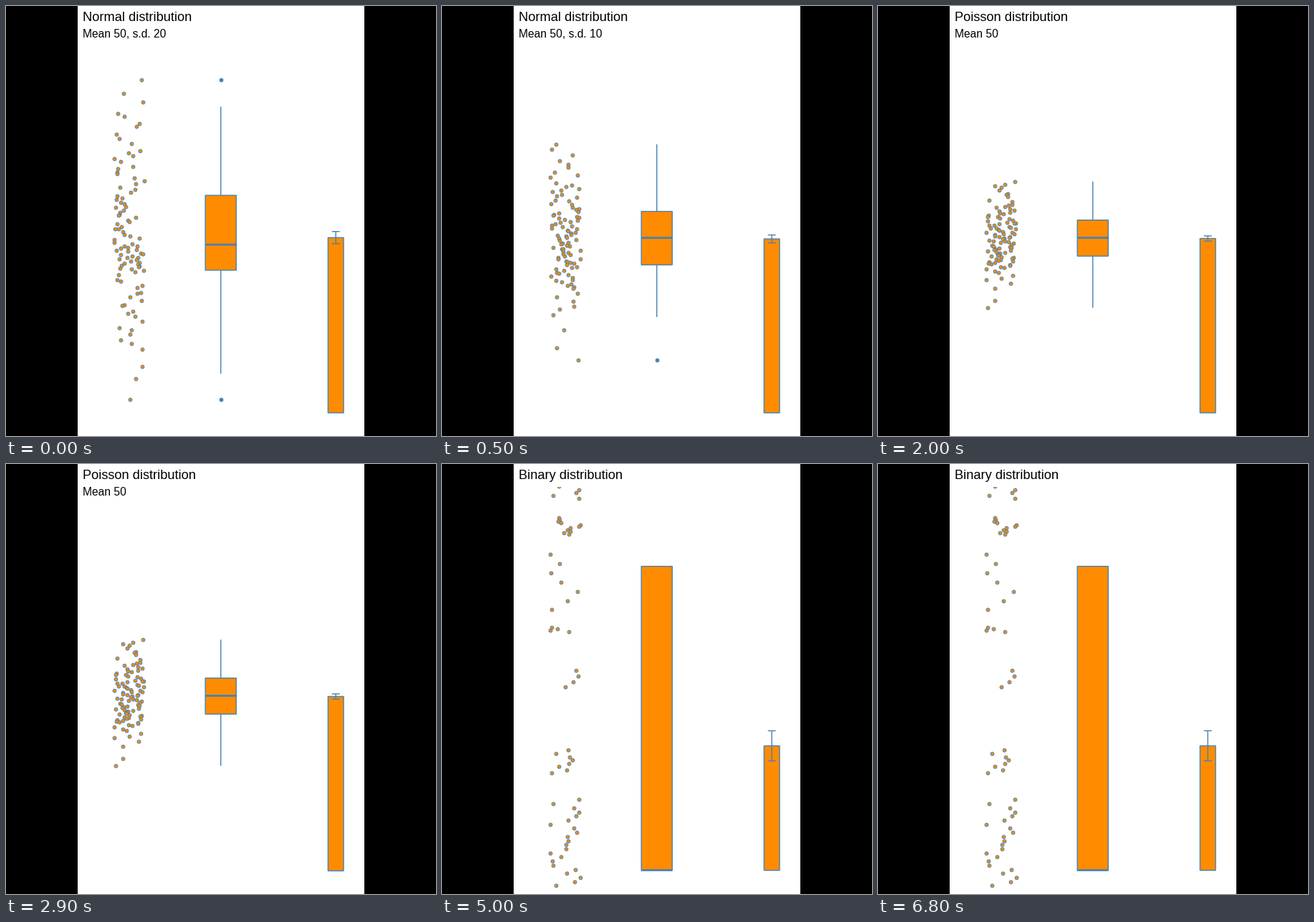
Write a matplotlib script that moves like this. It is 600 px wide and 600 px high and loops after 8000 ms.

```python
import numpy as np
import matplotlib.pyplot as plt
from matplotlib.animation import FuncAnimation
from matplotlib.patches import Rectangle

FILL, LINE = "darkorange", "steelblue"
PX = 0.72  # points per pixel at 100 dpi
STEP_MS = 500
RANKS = [0, 0.03, 0.1, 0.25, 0.5, 0.75, 0.9, 0.97, 1]
DOTS_X, BOX_X, BAR_X = 172, 299.7, 460.2
BASE = 567.7

rng = np.random.default_rng(50)
fig = plt.figure(figsize=(6, 6), dpi=100, facecolor="black")
ax = fig.add_axes([0, 0, 1, 1])
ax.set(xlim=(0, 600), ylim=(600, 0))
ax.axis("off")
ax.add_patch(Rectangle((100, 0), 400, 600, color="white", lw=0))


def stroke(xs, ys, width=1.4):
    return ax.plot(xs, ys, color=LINE, lw=width * PX, snap=False,
                   solid_capstyle="butt", zorder=3)[0]


def block(center, width, top, bottom):
    return ax.add_patch(Rectangle((center - width / 2, top), width, bottom - top,
                                  fc=FILL, ec=LINE, lw=1.4 * PX, snap=False,
                                  joinstyle="miter", zorder=2))


def label(y, text, size):
    return ax.text(106.8, y, text, family="Liberation Sans", size=size * PX,
                   color="black", va="baseline")


def dots(xs, ys, color):
    return ax.scatter(xs, ys, s=(4.9 * PX) ** 2, c=color, ec=LINE, lw=0.9 * PX,
                      snap=False, zorder=4)


def sample(quantiles, count=100):
    """Heights spread over the quantile curve, touching both extremes."""
    noise = rng.uniform(-0.4, 0.4, count) / count
    noise[[0, -1]] = 0
    return np.interp(np.linspace(0, 1, count) + noise, RANKS, quantiles)


def scene(title, subtitle, heights, box, whisker, bar, error,
          outliers=(), base=BASE, panel_top=54.5):
    xs = DOTS_X + rng.uniform(-21.5, 21.5, len(heights))
    points = dots(xs, heights + 0.4, FILL)
    points.set_clip_path(Rectangle((100, panel_top), 400, 600 - panel_top,
                                   transform=ax.transData))
    upper, median, lower = box
    ends = bar - error, bar + error
    return [
        label(21.4, title, 18.3),
        label(44.3, subtitle, 15.6),
        points,
        stroke([BOX_X] * 2, [max(whisker[0], panel_top), upper]),
        stroke([BOX_X] * 2, [lower, whisker[1]]),
        block(BOX_X, 43.1, upper, lower),
        stroke([BOX_X - 21.5, BOX_X + 21.5], [median] * 2, 2.8),
        dots([BOX_X] * len(outliers), outliers, LINE),
        block(BAR_X, 21.7, bar, base),
        stroke([BAR_X] * 2, ends),
        *[stroke([BAR_X - 5.5, BAR_X + 5.5], [y] * 2) for y in ends],
    ]


def quantile_scene(title, subtitle, quantiles, bar, error, whisker=None, outliers=()):
    return scene(title, subtitle, sample(quantiles), quantiles[3:6],
                 whisker or (quantiles[0], quantiles[-1]), bar, error, outliers)


normal_wide = quantile_scene(
    "Normal distribution", "Mean 50, s.d. 20",
    [103, 147, 200, 264.2, 333, 368.7, 433, 480, 549],
    bar=323.2, error=8.5, whisker=(140.5, 513), outliers=(103.4, 549.4))

normal_narrow = quantile_scene(
    "Normal distribution", "Mean 50, s.d. 10",
    [193, 216, 249, 286.6, 323.5, 361.2, 391, 428, 494],
    bar=325, error=5.5, whisker=(193, 434), outliers=(494.3,))

poisson = quantile_scene(
    "Poisson distribution", "Mean 50",
    [245, 254, 276, 298.7, 323.4, 349, 364, 385, 421],
    bar=324.4, error=3.6)

logarithmic = quantile_scene(
    "Logarithmic distribution", "Mean 50, s.d. 5",
    [-400, -150, 30, 310.7, 482.8, 536.4, 553, 560, 563],
    bar=331.2, error=36)

# Loose clusters as (top, bottom, count).
clusters = [(31, 48, 5), (75, 98, 11), (126, 203, 7), (228, 234, 4),
            (288, 311, 4), (399, 431, 8), (468, 588, 22)]
binary = scene(
    "Binary distribution", "",
    np.concatenate([np.linspace(*cluster) for cluster in clusters]),
    box=(142.8, 566.8, 567.1), whisker=(142.8, 567), bar=393.2, error=21,
    base=567, panel_top=32)

# Each distribution with the number of steps it stays on screen.
holds = [(normal_wide, 1), (normal_narrow, 3), (poisson, 3), (logarithmic, 3), (binary, 6)]
timeline = [artists for artists, steps in holds for _ in range(steps)]


def update(step):
    for artists, _ in holds:
        for artist in artists:
            artist.set_visible(artists is timeline[step])
    return []


update(0)
anim = FuncAnimation(fig, update, frames=len(timeline), interval=STEP_MS,
                     repeat=True, repeat_delay=0, blit=False)
plt.show()
```
